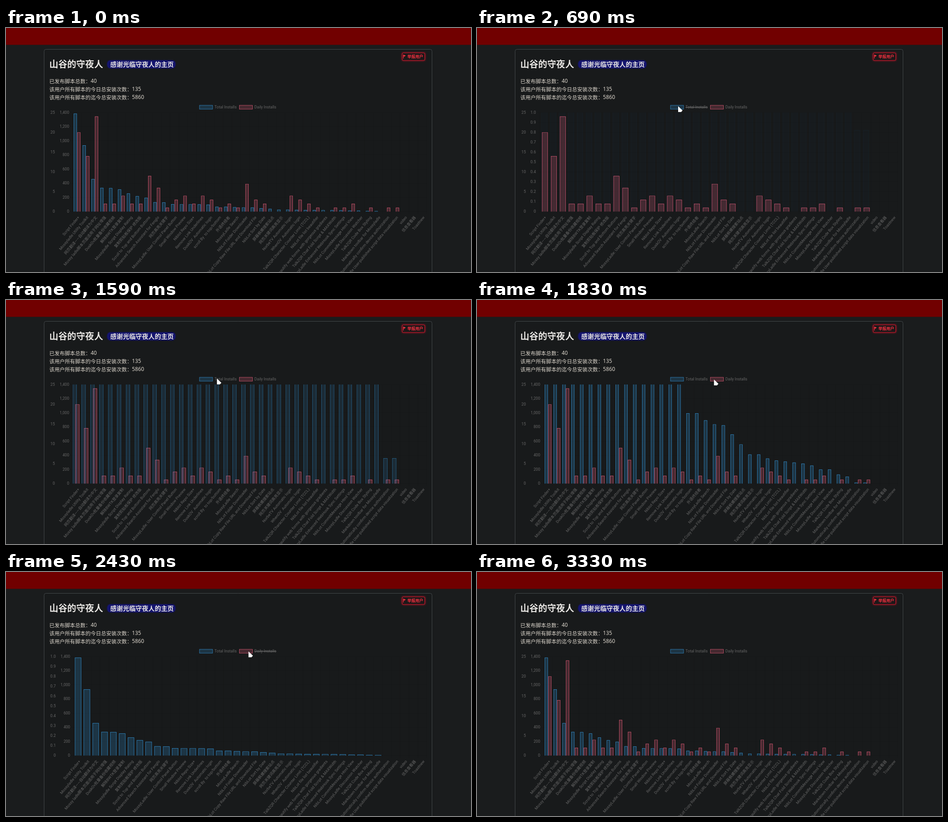
These frames come from a looping animation (1031x543 px, 3930 ms). An HTML page with a canvas:

```html
<!DOCTYPE html>
<html lang="zh-CN">
<head>
<meta charset="utf-8">
<title>脚本安装统计</title>
<style>
html, body { margin: 0; width: 100%; height: 100%; overflow: hidden; background: #1a1c1d; }
canvas { display: block; }
</style>
</head>
<body>
<canvas id="stage" width="1031" height="543"></canvas>
<script>
const ctx = document.getElementById('stage').getContext('2d');
const W = 1031, H = 543, LOOP = 3930, STEP = 30;
const TOP = 188, BOTTOM = 408.7, RIGHT = 932.7, HEIGHT = BOTTOM - TOP;
const CJK = '"Noto Sans CJK SC", sans-serif';
const CHART_FONT = '8.65px Roboto, ' + CJK;
const GREY = '#666';
const LINE = 0.72, LINE_ALPHA = 0.85;

const labels = [
  'Script Finder+', 'Mossyladle Utility Toolkit', '网页翻译——自动翻译为中文',
  'Mossy ladle脚本页面适用于网址增强', 'DuskOv批量备份收藏视频', '解除BWTK登录复制',
  'Mossyladle Script Display Rating', '复制剪贴板保护 修改版',
  'Scroll to Top and Bottom Buttons', 'Advanced Search Assistant for Fenglo',
  '网页高亮关键字', 'MossyLadle: User Control Panel Button', 'Small Window Preview',
  'Niblot Repo Size+', 'Remove Link Underlines', 'DuskOV  Automatic login',
  'scroll By  to top/bottom', '外语终结者', 'MossyLadle Search',
  'NibLot Folder Downloader', 'NibLot Copy Raw File URL and Download File',
  'NibLot Sort by Date', '屏蔽枫螺搜索站点', '网页关键词高亮显示',
  'NorbeTV Automatic login', 'WhenOV  Automatic login',
  'TalkZQR Character Counter Limit (TCCL)', 'NibLot file list beautifier',
  'Beautify web forms with gorgeous gradients', 'TalkZQR Chat Fold Script & MAXWidth',
  'MossyLadle Enhanced WebHook Sync Settings', 'NibLot CommitMessage Html View',
  'MossyLadle Discussion Watcher', 'TalkZQR Code Box Styling',
  'Markdown toolbar for Mossyladle', 'Automatically confirm device authorization',
  'Mossy Ladle User-published script data visualization', 'video', '信息查看器', 'Toastnew'
];
const COUNT = labels.length;

const series = [
  { name: 'Total Installs', rgb: [54, 162, 235], max: 1400, tick: 200, legendX: 429,
    values: [1384, 937, 459, 336, 332, 314, 256, 218, 196, 133, 131, 106, 105, 105, 102, 100,
      70, 70, 63, 59, 58, 49, 39, 29, 29, 25, 23, 22, 21, 20, 18, 14, 14, 9, 7, 1, 1] },
  { name: 'Daily Installs', rgb: [255, 99, 132], max: 25, tick: 5, legendX: 517.5,
    values: [20, 14, 24, 2, 2, 4, 2, 2, 9, 6, 1, 3, 4, 2, 4, 3, 1, 2, 1, 7, 3, 2, 0, 0,
      4, 3, 2, 1, 0, 1, 1, 2, 0, 1, 0, 1, 1] }
];

// Each legend click starts a phase; hidden is the index of the switched-off series.
const phases = [
  { at: 0, lag: 0, left: 147.8, hidden: -1 },
  { at: 480, lag: 0, left: 138.3, hidden: 0 },
  { at: 1410, lag: 7, left: 147.8, hidden: -1 },
  { at: 1890, lag: 0, left: 150, hidden: 1 },
  { at: 2610, lag: 0, left: 147.8, hidden: -1 }
];
const DURATION = 600;

// Pointer path: time, x, y
const pointer = [
  [60, 1022, 23], [120, 800, 100], [180, 560, 172], [240, 444, 186], [270, 446, 174],
  [1500, 446, 174], [1830, 525.5, 177], [1890, 537.7, 176.7],
  [3060, 537.7, 176.7], [3180, 700, 158], [3330, 1040, 116]
];

const lerp = (a, b, k) => a + (b - a) * k;
const easeOut = p => 1 - Math.pow(1 - p, 4);
const clamp = p => Math.max(0, Math.min(1, p));

// A colour on its way to transparent black, blended in linear light.
function fade(rgb, opacity, k) {
  const dim = Math.pow(k, 1 / 2.2);
  return `rgba(${rgb.map(c => Math.round(c * dim))},${opacity * k})`;
}

function text(str, x, y, font, color, align = 'left') {
  ctx.font = font;
  ctx.fillStyle = color;
  ctx.textAlign = align;
  ctx.textBaseline = 'middle';
  ctx.fillText(str, x, y);
}

function roundBox(x, y, w, h, r) {
  ctx.beginPath();
  ctx.roundRect(x, y, w, h, r);
}

function polygon(points, color) {
  ctx.beginPath();
  points.forEach(([x, y]) => ctx.lineTo(x, y));
  ctx.closePath();
  ctx.fillStyle = color;
  ctx.fill();
}

function glow(color, blur) {
  ctx.shadowColor = color;
  ctx.shadowBlur = blur;
}

function drawPage() {
  ctx.fillStyle = '#1a1c1d';
  ctx.fillRect(0, 0, W, H);
  ctx.fillStyle = '#710000';
  ctx.fillRect(0, 0, W, 37.5);

  roundBox(84.5, 47.5, 860, 520, 4);
  ctx.fillStyle = '#181a1b';
  ctx.fill();
  ctx.strokeStyle = '#44494b';
  ctx.lineWidth = 1;
  ctx.stroke();

  text('山谷的守夜人', 96, 80.2, 'bold 19.9px ' + CJK, '#e8e6e3');
  ctx.save();
  glow('#14146e', 3);
  roundBox(224.5, 72, 151, 17.5, 7);
  ctx.fillStyle = '#14146e';
  ctx.fill();
  ctx.restore();
  text('感谢光临守夜人的主页', 231, 81, 'bold 14.1px ' + CJK, '#e8e6e3');

  const lines = [['已发布脚本总数：', '40', 187.8], ['该用户所有脚本的今日总安装次数：', '135', 279.3],
    ['该用户所有脚本的迄今总安装次数：', '5860', 279.3]];
  lines.forEach(([label, value, x], i) => {
    const y = 118.3 + i * 18.2;
    text(label, 96, y, '11.47px ' + CJK, '#dcd6cc');
    text(value, x, y, '11.8px "Noto Sans", sans-serif', '#dcd6cc');
  });

  ctx.save();
  glow('#c4162a', 4);
  roundBox(878, 55, 51, 17.5, 3);
  ctx.fillStyle = '#c4162a';
  ctx.fill();
  ctx.restore();
  roundBox(879.1, 56.1, 48.8, 15.3, 2);
  ctx.fillStyle = '#1c1819';
  ctx.fill();
  polygon([[880.5, 59], [886.5, 61.5], [881.8, 64.2], [881.8, 68], [880.5, 68]], '#f2303f');
  text('举报用户', 890, 63.8, 'bold 8.75px ' + CJK, '#f2303f');
}

function drawLegend(hidden) {
  series.forEach((s, i) => {
    ctx.fillStyle = fade(s.rgb, 0.2, 1);
    ctx.strokeStyle = fade(s.rgb, LINE_ALPHA, 1);
    ctx.lineWidth = LINE;
    ctx.fillRect(s.legendX, 172, 29, 8.7);
    ctx.strokeRect(s.legendX, 172, 29, 8.7);
    const x = s.legendX + 33.3;
    text(s.name, x, 176.8, CHART_FONT, GREY);
    if (i === hidden) {
      ctx.fillStyle = GREY;
      ctx.fillRect(x, 175.8, ctx.measureText(s.name).width, 1.4);
    }
  });
}

function drawAxis(index, right, hidden) {
  const s = series[index];
  const max = hidden ? 1 : s.max;
  const steps = hidden ? 10 : max / s.tick;
  for (let i = 0; i <= steps; i++) {
    const v = max * i / steps;
    const label = hidden && i ? v.toFixed(1) : v.toLocaleString('en-US');
    text(label, right, BOTTOM - HEIGHT * i / steps, CHART_FONT, GREY, 'right');
  }
}

function drawGrid({ left, hidden }) {
  const pitch = (RIGHT - left) / COUNT;
  const rows = hidden === 0 ? 10 : 7;
  ctx.fillStyle = 'rgba(0,0,0,0.1)';
  for (let i = 0; i <= COUNT; i++) ctx.fillRect(left + i * pitch - 0.4, TOP, 0.8, HEIGHT + 5.8);
  for (let i = 0; i <= rows; i++) {
    ctx.fillRect(left - 5.8, TOP + HEIGHT * i / rows - 0.4, RIGHT - left + 5.8, 0.8);
  }
  labels.forEach((label, i) => {
    ctx.save();
    ctx.translate(left + (i + 0.5) * pitch, BOTTOM + 8.2);
    ctx.rotate(-50 * Math.PI / 180);
    text(label, 0, 5.1, CHART_FONT, GREY, 'right');
    ctx.restore();
  });
}

// Settled geometry of one series in a phase.
function target(index, { left, hidden }) {
  const pitch = (RIGHT - left) / COUNT;
  const both = hidden < 0;
  const off = hidden === index;
  return {
    left,
    shift: both ? (index ? 0.2 : -0.2) * pitch : 0,
    width: pitch * (both ? 0.36 : 0.72),
    scale: HEIGHT / (off ? 1 : series[index].max),
    alpha: off ? 0 : 1
  };
}

function poseAt(index, t) {
  let pose = target(index, phases[0]);
  for (let i = 1; i < phases.length && phases[i].at <= t; i++) {
    const end = i + 1 < phases.length ? Math.min(t, phases[i + 1].at) : t;
    const k = easeOut(clamp((end - phases[i].at - phases[i].lag) / DURATION));
    const goal = target(index, phases[i]);
    const next = {};
    for (const key in goal) next[key] = lerp(pose[key], goal[key], k);
    pose = next;
  }
  return pose;
}

function drawBars(index, t) {
  const { left, shift, width, scale, alpha } = poseAt(index, t);
  if (alpha < 0.004) return;
  const { rgb, values } = series[index];
  const pitch = (RIGHT - left) / COUNT;
  const fill = fade(rgb, 0.2, alpha), border = fade(rgb, LINE_ALPHA, alpha);
  values.forEach((v, i) => {
    const h = v * scale, y = BOTTOM - h;
    if (h < LINE / 2) return;
    const x = left + (i + 0.5) * pitch + shift - width / 2;
    const edge = Math.min(LINE, h);
    ctx.fillStyle = fill;
    ctx.fillRect(x, y, width, h);
    ctx.fillStyle = border;
    ctx.beginPath();
    ctx.rect(x, y, width, h);
    ctx.rect(x + LINE, y + edge, width - 2 * LINE, h - edge);
    ctx.fill('evenodd');
  });
}

function drawPointer(t) {
  const n = pointer.findIndex(p => p[0] > t);
  if (n < 1) return;
  const [t0, x0, y0] = pointer[n - 1], [t1, x1, y1] = pointer[n];
  const k = (t - t0) / (t1 - t0);
  const x = lerp(x0, x1, k), y = lerp(y0, y1, k);
  polygon([[x, y], [x + 9.8, y + 9.5], [x + 6.6, y + 13], [x, y + 13]], '#fff');
}

function draw(t) {
  const phase = phases.filter(p => p.at <= t).pop();
  drawPage();
  drawLegend(phase.hidden);
  drawAxis(0, phase.left - 7.8, phase.hidden === 0);
  drawAxis(1, phase.hidden === 1 ? 110.3 : 108.3, phase.hidden === 1);
  drawGrid(phase);
  ctx.save();
  ctx.beginPath();
  ctx.rect(phase.left, TOP, RIGHT - phase.left, HEIGHT);
  ctx.clip();
  drawBars(1, t);
  drawBars(0, t);
  ctx.restore();
  drawPointer(t);
}

const start = performance.now();
function frame() {
  const t = (performance.now() - start) % LOOP;
  draw(Math.floor(t / STEP) * STEP);
  requestAnimationFrame(frame);
}
frame();
</script>
</body>
</html>
```
